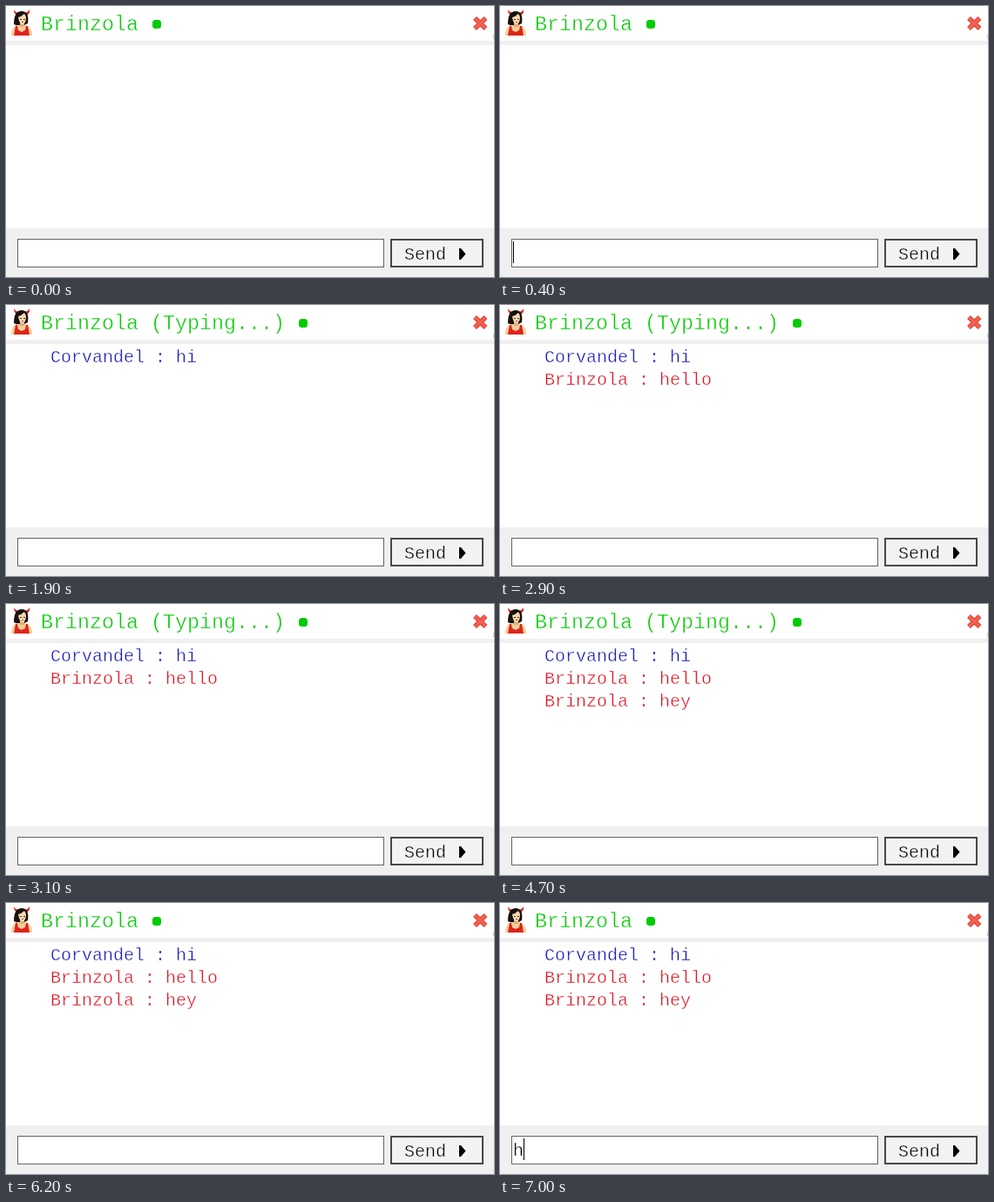
Write an HTML page with a canvas that moves like this. It is 560 px wide and 312 px high and loops after 7100 ms.

```html
<!DOCTYPE html>
<html lang="en">
<head>
<meta charset="utf-8">
<title>Chat window</title>
<style>
  html, body { margin: 0; width: 100%; height: 100%; overflow: hidden; background: #fff; }
  canvas { display: block; width: 560px; height: 312px; }
</style>
</head>
<body>
<canvas id="stage" width="560" height="312"></canvas>
<script>
const LOOP = 7100;
const FRIEND = 'Brinzola';
const ME = 'Corvandel';
const GREEN = '#00cc00', BLUE = '#1414b8', RED = '#e00f1c', INK = '#000';
const PAPER = '#fff', PANEL = '#f0f0f0';
const HAIR = '#18120f', SKIN = '#f3cf9c', DRESS = '#dd2519';
const TEXT_SIZE = 20, TITLE_SIZE = 70 / 3;   // advances of 12 and 14 px

const MESSAGES = [
  { at: 1300, text: ME + ' : hi', color: BLUE },
  { at: 2900, text: FRIEND + ' : hello', color: RED },
  { at: 4700, text: FRIEND + ' : hey', color: RED }
];

const ctx = document.getElementById('stage').getContext('2d');
const within = (t, from, to) => t >= from && t < to;

function rect(x, y, w, h, color) {
  ctx.fillStyle = color;
  ctx.fillRect(x, y, w, h);
}

function shape(path, color) {
  ctx.fillStyle = color;
  ctx.fill(new Path2D(path));
}

// A fine outline in the background colour gives the letters a light weight.
function text(str, x, y, color, size = TEXT_SIZE, back = PAPER) {
  ctx.font = size + 'px "Liberation Mono", monospace';
  ctx.fillStyle = color;
  ctx.fillText(str, x, y);
  ctx.strokeStyle = back;
  ctx.lineWidth = 0.5;
  ctx.lineJoin = 'round';
  ctx.strokeText(str, x, y);
}

function box(x, y, w, h, line, border, fill) {
  rect(x, y, w, h, border);
  rect(x + line, y + line, w - 2 * line, h - 2 * line, fill);
}

function drawAvatar() {
  // horns, hair
  shape('M9 4 Q9 10 14 11 L16 8 Q11 8 9 4Z M27 4 Q28 10 22 11 L20 8 Q25 8 27 4Z', DRESS);
  shape('M9 21 Q9 6 18 6 Q27 6 25 20 L21 22 L14 23Z', HAIR);
  // shoulders and arms, dress with straps, neckline
  shape('M6 34 Q6 24 13 22 L22 22 Q30 24 30 34Z', SKIN);
  shape('M9 34 L11 23 L13 23 L14 28 L18 30 L22 28 L23 23 L25 23 L27 34Z', DRESS);
  // face below the fringe
  rect(16, 18, 5, 6, '#e2ae78');
  shape('M14 13 Q18 12 21 9 Q23 11 23 15 Q22 21 18.5 21 Q15 20 14 13Z', '#f6d9b0');
  rect(16, 15, 2, 1, '#4b3023');
  rect(20, 15, 2, 1, '#4b3023');
  rect(18, 18, 2, 1, '#c43b30');
}

function drawClose() {
  for (const [width, color] of [[5.5, '#d83c32'], [3.5, '#f4604f']]) {
    ctx.strokeStyle = color;
    ctx.lineWidth = width;
    ctx.stroke(new Path2D('M538 14 L550.5 26 M550.5 14 L538 26'));
  }
  rect(559, 33, 1, 5, '#c8c8c8');
}

function drawHeader(typing) {
  const title = FRIEND + (typing ? ' (Typing...)' : '');
  rect(0, 40, 560, 5, PANEL);
  drawAvatar();
  text(title, 40, 28, GREEN, TITLE_SIZE);
  ctx.beginPath();
  ctx.roundRect(35 + (title.length + 1.5) * 14, 16, 10, 10, 3.5);
  ctx.fillStyle = GREEN;
  ctx.fill();
  drawClose();
}

function drawFooter(draft, caret) {
  rect(0, 256, 560, 56, PANEL);
  box(13, 268, 421, 33, 1, '#646464', PAPER);
  text(draft, 15, 291, INK);
  if (caret) rect(15 + draft.length * 12, 271, 1, 25, INK);
  box(441, 268, 107, 33, 2, '#484848', '#f2f2f2');
  text('Send', 457, 292, INK, TEXT_SIZE, '#f2f2f2');
  shape('M520 279 L522 279 L527.5 285.5 L522 292 L520 292Z', INK);
}

function draw(t) {
  rect(0, 0, 560, 312, PAPER);
  drawHeader(within(t, 1800, 6100));

  MESSAGES.forEach((m, i) => {
    if (t >= m.at) text(m.text, 51, 66 + i * 26, m.color);
  });

  const draft = within(t, 1200, 1300) ? 'hi'
    : within(t, 900, 1200) || t >= 6900 ? 'h' : '';
  const caret = draft || within(t, 200, 700) || within(t, 1300, 1900);
  drawFooter(draft, caret);
}

const start = performance.now();
function tick() {
  draw((performance.now() - start) % LOOP);
  requestAnimationFrame(tick);
}
tick();
</script>
</body>
</html>
```
